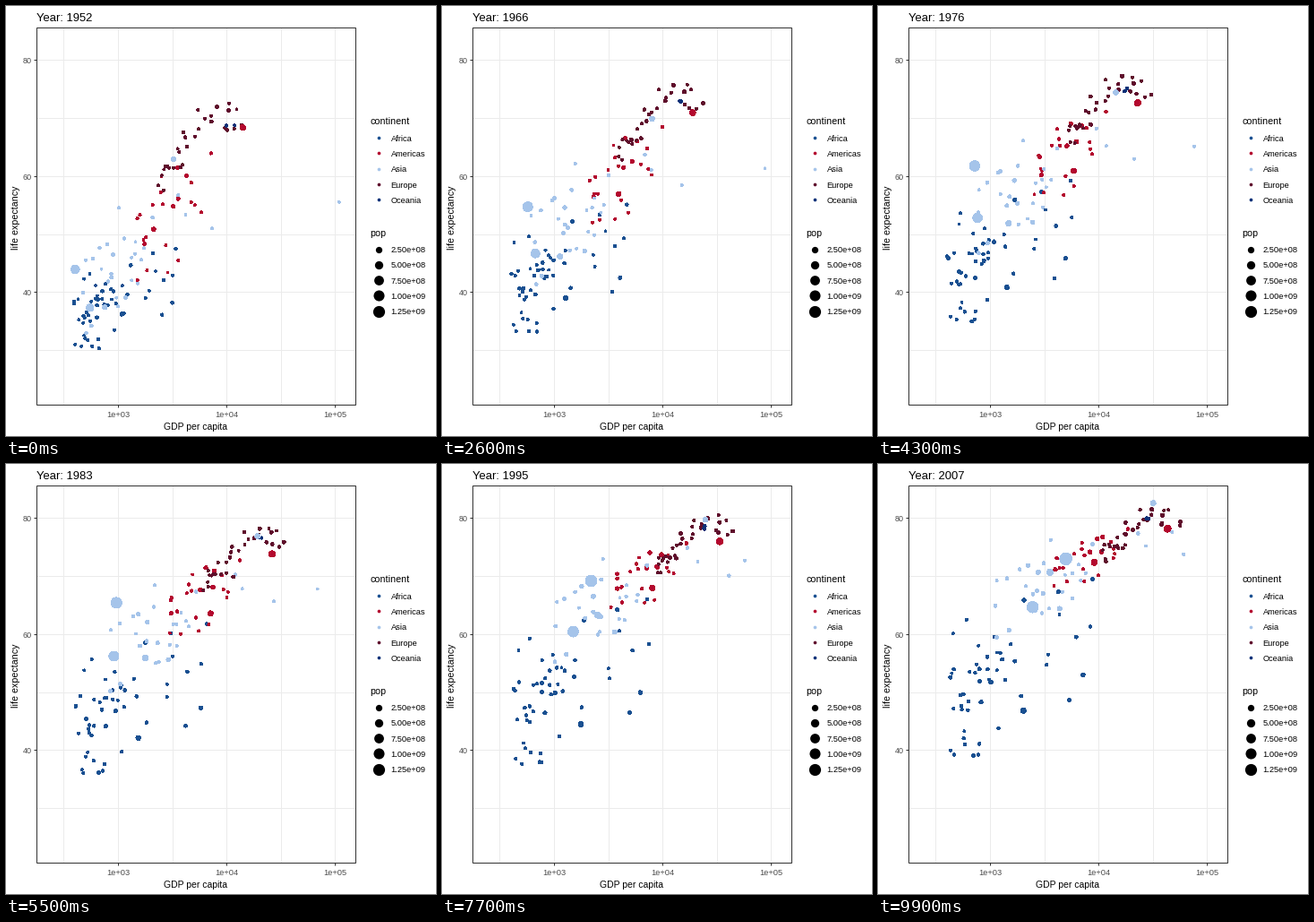
These frames come from a looping animation (480x480 px, 10 s). A matplotlib script:

```python
import matplotlib.pyplot as plt
import numpy as np
from matplotlib.animation import FuncAnimation
from matplotlib.patches import Rectangle

plt.rcParams["font.family"] = "Liberation Sans"

SIZE, DPI = 480, 72
FRAMES, STEP_MS = 100, 100
YEAR0, YEAR1 = 1952, 2007
KNOTS = np.linspace(0, 1, 12)  # a survey every five years

LEFT, RIGHT, TOP, BOTTOM = 34, 390, 24, 445
LOG_MIN, LOG_MAX = 2.2487, 5.1888
LIFE_MIN, LIFE_MAX = 20.65, 85.55
MAX_POP = 1319

COLORS = {
    "Africa": "#1a5091",
    "Americas": "#b3082e",
    "Asia": "#a5c4ea",
    "Europe": "#5f0f2c",
    "Oceania": "#0d3178",
}

rng = np.random.default_rng(7)
tracks = []


def px(log_gdp):
    return LEFT + (log_gdp - LOG_MIN) * (RIGHT - LEFT) / (LOG_MAX - LOG_MIN)


def py(life):
    return BOTTOM - (life - LIFE_MIN) * (BOTTOM - TOP) / (LIFE_MAX - LIFE_MIN)


def diameter(pop):
    """Dot width in pixels for a population in millions."""
    return 2.5 + 11 * np.sqrt(pop / MAX_POP)


def ease(a, b):
    """Go from a to b over the survey years, a little faster at first."""
    return a + (b - a) * (KNOTS + 0.4 * KNOTS * (1 - KNOTS))


def cloud(group, count, rho, growth, start, end):
    """Scatter countries around a moving (log gdp, spread, life, spread)."""
    mx, sx, my, sy = (ease(a, b) for a, b in zip(start, end))
    for _ in range(count):
        u, v = rng.normal(size=2).clip(-1.7, 1.7)
        z = np.clip(rho * u + np.sqrt(1 - rho ** 2) * v, -1.7, 1.7)
        skewed = u + 0.18 * (u * u - 1)
        log_gdp = mx + sx * skewed + rng.normal(0, 0.02, len(KNOTS))
        life = my + sy * z + rng.normal(0, 0.25, len(KNOTS))
        pop = min(rng.lognormal(1.4, 1.1), 50)
        tracks.append((COLORS[group], log_gdp, life, ease(pop, pop * growth)))


def giant(group, pops, *points):
    """Add one large or outlying country from a few (gdp, life) points."""
    gdp, life = np.array(points, float).T
    when = np.linspace(0, 1, len(points))
    tracks.append((
        COLORS[group],
        np.interp(KNOTS, when, np.log10(gdp)),
        np.interp(KNOTS, when, life),
        np.linspace(*pops, len(KNOTS)),
    ))


cloud("Africa", 51, 0.45, 2.6, (2.98, 0.27, 39.2, 5), (3.15, 0.38, 54.5, 9))
cloud("Americas", 23, 0.65, 2.0, (3.46, 0.22, 54, 8.5), (3.9, 0.22, 73.5, 3.5))
cloud("Asia", 28, 0.75, 2.5, (3.15, 0.34, 47, 8.5), (3.75, 0.5, 70.5, 6.5))
cloud("Europe", 30, 0.8, 1.25, (3.7, 0.23, 65.5, 4.5), (4.33, 0.2, 77.5, 2.7))
cloud("Oceania", 2, 0.5, 2.0, (4.01, 0.01, 69.2, 0.2), (4.47, 0.07, 80.7, 0.5))

giant("Asia", (556, 1319), (400, 44), (780, 64.5), (4959, 73))
giant("Asia", (372, 1110), (547, 37.4), (800, 55.2), (2452, 64.7))
giant("Asia", (86, 127), (3217, 63), (18000, 76.2), (31656, 82.6))
giant("Asia", (82, 224), (750, 37.5), (3541, 70.7))
giant("Asia", (0.2, 2.5), (108382, 55.6), (47307, 77.6))
giant("Americas", (158, 301), (13990, 68.4), (42952, 78.2))
giant("Americas", (57, 190), (2109, 50.9), (6850, 62.5), (9066, 72.4))
giant("Africa", (33, 135), (1077, 36.3), (2014, 46.9))

colors, logs, lives, pops = zip(*tracks)
knot_x = px(np.array(logs)) + 0.5
knot_y = py(np.array(lives)) + 0.5
knot_d = diameter(np.array(pops))

fig = plt.figure(figsize=(SIZE / DPI, SIZE / DPI), dpi=DPI, facecolor="white")
ax = fig.add_axes([0, 0, 1, 1])
ax.set_xlim(0, SIZE)
ax.set_ylim(SIZE, 0)
ax.axis("off")


def line(xs, ys, color, z=1):
    ax.plot(xs, ys, color=color, lw=1, solid_capstyle="butt", zorder=z)


def label(x, y, text, size, color="black", **kw):
    return ax.text(x, y, text, fontsize=size, color=color, **kw)


def dots(x, y, d, color):
    return ax.scatter(x, y, s=np.square(d), c=color, linewidths=0,
                      antialiased=False, snap=False, zorder=3)


# Grid, panel border and axes
for g in np.arange(2.5, 5.1, 0.5):
    line([px(g)] * 2, [TOP, BOTTOM], "#ebebeb")
for g in range(30, 81, 10):
    line([LEFT, RIGHT], [py(g)] * 2, "#ebebeb")
for e in (3, 4, 5):
    line([px(e)] * 2, [BOTTOM, BOTTOM + 3], "#333333", 2)
    label(px(e), 459, f"1e+0{e}", 9.2, "#4d4d4d", ha="center")
for life in (40, 60, 80):
    line([LEFT - 3, LEFT], [py(life)] * 2, "#333333", 2)
    label(29, py(life) + 4, str(life), 9, "#4d4d4d", ha="right")
ax.add_patch(Rectangle((LEFT, TOP), RIGHT - LEFT, BOTTOM - TOP,
                       fill=False, ec="#333333", lw=1, zorder=4))
label(212, 473, "GDP per capita", 10.4, ha="center")
label(11.5, 236, "life expectancy", 10.6, ha="center", va="center", rotation=90)

# Legends
label(406.5, 132, "continent", 10.8)
for k, (name, color) in enumerate(COLORS.items()):
    y = 147.2 + 17.28 * k
    dots(415.5, y, 3.7, color)
    label(429.5, y + 3.6, name, 9.2)
label(406.5, 257, "pop", 10.8)
for k in range(5):
    y, pop = 271.6 + 17.28 * k, 250 * (k + 1)
    dots(415.5, y, diameter(pop), "black")
    label(429.5, y + 3.6, f"{pop * 1e6:.2e}", 9.2)

title = label(33.5, 17, "", 13)
countries = dots(knot_x[:, 0], knot_y[:, 0], knot_d[:, 0], list(colors))


def update(i):
    t = i / (FRAMES - 1)
    pos = t * (len(KNOTS) - 1)
    j = min(int(pos), len(KNOTS) - 2)
    f = pos - j
    x, y, d = (k[:, j] * (1 - f) + k[:, j + 1] * f for k in (knot_x, knot_y, knot_d))
    countries.set_offsets(np.column_stack([x, y]))
    countries.set_sizes(d ** 2)
    title.set_text(f"Year: {round(YEAR0 + (YEAR1 - YEAR0) * t)}")
    return countries, title


anim = FuncAnimation(fig, update, frames=FRAMES, interval=STEP_MS,
                     repeat=True, repeat_delay=0)
plt.show()
```
